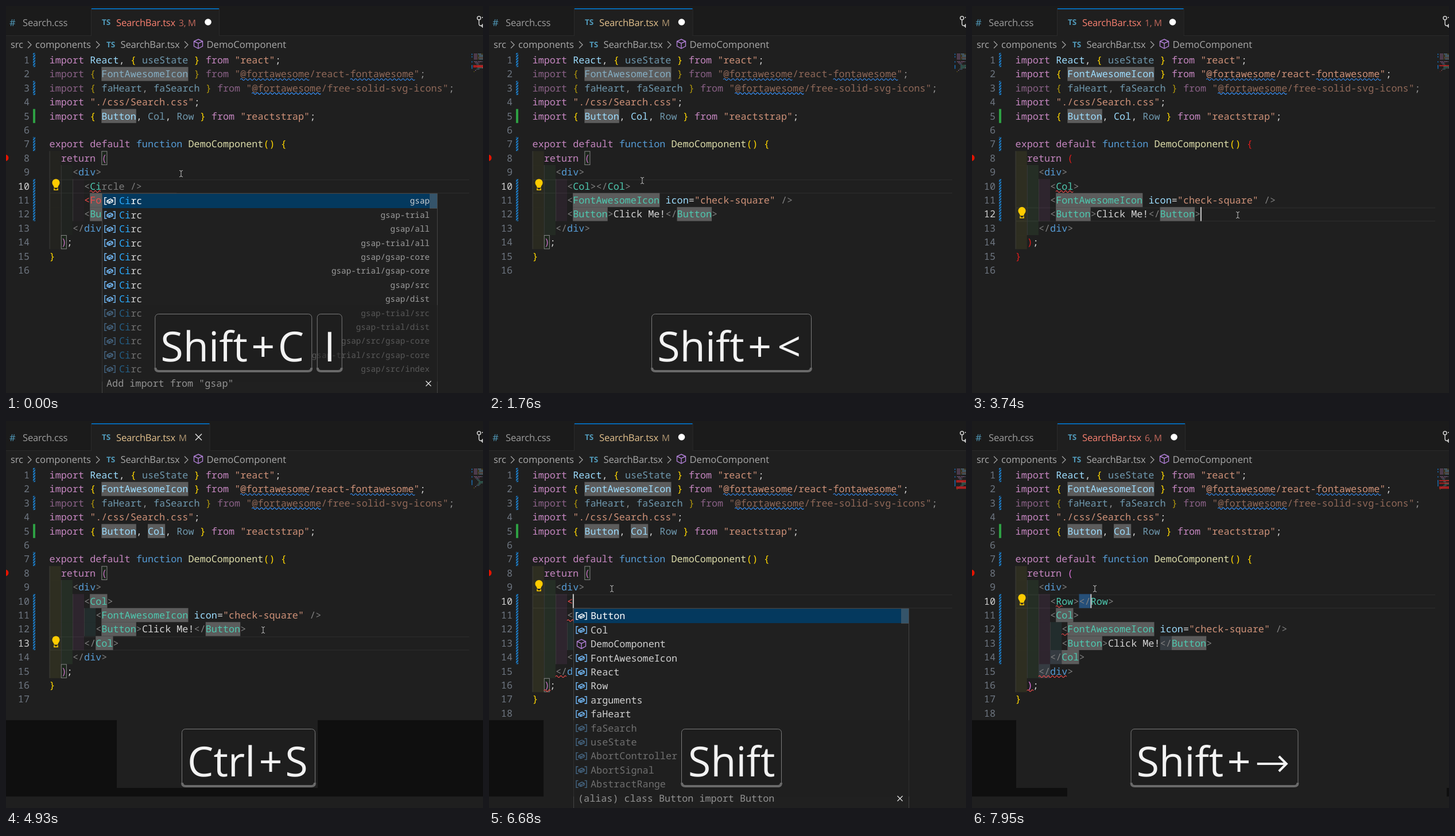
Animation of 831 by 674 pixels, one loop 8 s. Source, as an HTML page:

```html
<!DOCTYPE html>
<html lang="en">
<head>
<meta charset="utf-8">
<title>Editor demo</title>
<style>
html, body { margin: 0; width: 100%; height: 100%; overflow: hidden; background: #1f1f1f; }
svg { display: block; width: 831px; height: 674px; }
text { font: 16.8px 'Noto Sans Mono', 'DejaVu Sans Mono', monospace; white-space: pre; text-rendering: geometricPrecision; }
.ui { font: 16.6px 'Open Sans', 'Noto Sans', sans-serif; }
.tight { letter-spacing: -.22px; }
.icon { font: bold 13.5px 'Open Sans', 'Noto Sans', sans-serif; }
.key { font: 72px 'Open Sans', 'Noto Sans', sans-serif; }
.small { font-size: 14.25px; }
</style>
</head>
<body>
<svg id="stage" viewBox="0 0 831 674"></svg>
<script>
const stage = document.getElementById('stage');
const LOOP = 8000, CHAR = 10.08, LEFT = 75.6, TOP = 81.8, ROW = 24.4;

// Lower-case codes pick a colour; upper-case ones draw it faded.
const INK = {
  k: '#c586c0', v: '#9cdcfe', s: '#ce9178', w: '#d4d4d4', y: '#ffd700', o: '#da70d6',
  g: '#808080', t: '#4ec9b0', b: '#569cd6', f: '#dcdcaa', r: '#f14c4c', h: '#7c7c7c', x: '#dd1c1c'
};
const RAINBOW = ['#ffff40', '#7fff7f', '#ff7fff', '#4fecec'];

const colX = c => LEFT + c * CHAR;
const rowY = n => TOP + (n - 1) * ROW;
const mapY = n => 80.8 + n * 2.2;
const esc = s => s.replace(/&/g, '&amp;').replace(/</g, '&lt;').replace(/>/g, '&gt;');
const rect = (x, y, w, h, fill, more = '') =>
  `<rect x="${x}" y="${y}" width="${w}" height="${h}" fill="${fill}" ${more}/>`;
const text = (x, y, s, fill, more = '') => `<text x="${x}" y="${y}" fill="${fill}" ${more}>${esc(s)}</text>`;
const path = (d, stroke, width = 1.3, more = '') =>
  `<path d="${d}" fill="none" stroke="${stroke}" stroke-width="${width}" ${more}/>`;
const at = (x, y, s) => `<g transform="translate(${x} ${y})">${s}</g>`;

// Document pieces
const DIV = '    g<|bdiv|g>', END = '    g</|bdiv|g>';
const icon = (pad, c = 'g') => `${pad}${c}<|tFontAwesomeIcon|w |vicon|w=|s"check-square"|g />`;
const button = pad => `${pad}g<|tButton|g>|wClick Me!|g</|tButton|g>`;
const P6 = ' '.repeat(6), P8 = ' '.repeat(8);
const OPEN = P6 + 'g<|tCol|g>', CLOSE = P6 + 'g</|tCol|g>';
const flat = line => [DIV, P6 + line, icon(P6), button(P6), END];
const broken = line => [DIV, P6 + line, P6 + 'r<|rFontAwesomeIcon', button(P6), END];
const nested = [OPEN, icon(P8), button(P8), CLOSE];
const wrapped = line => [DIV, P6 + line, ...nested, END];
const typing = line => [DIV, P6 + line, P6 + 'b<|rCol', P8 + 'r<|tFontAwesomeIcon', button(P8), CLOSE, '    v</div'];

const fadeLine = s => s.replace(/(^|\|)(\w)/g, (m, bar, c) => bar + c.toUpperCase());
function documentLines(s) {
  const l2 = 'kimport |y{ |vFontAwesomeIcon|y } |kfrom |s"@fortawesome/react-fontawesome"|w;';
  const l3 = 'kimport |y{ |vfaHeart|w, |vfaSearch|y } |kfrom |s"@fortawesome/free-solid-svg-icons"|w;';
  const [a, b] = s.unclosed ? 'xx' : 'yo';
  return [
    'kimport |vReact|w, |y{ |VuseState|y } |kfrom |s"react"|w;',
    s.unused ? fadeLine(l2) : l2,
    fadeLine(l3),
    'kimport |s"./css/Search.css"|w;',
    `kimport |y{ |vButton|w, |${s.noCol ? 'V' : 'v'}Col|w, |VRow|y } |kfrom |s"reactstrap"|w;`,
    '',
    `kexport |kdefault |bfunction |fDemoComponent|y() |${a}{`,
    `  kreturn |${b}(`,
    ...s.body,
    `  ${b})|w;`, `${a}}`, ''
  ];
}

// Suggestion lists: "label detail"
const each = (label, details) => details.split(' ').map(d => label + ' ' + d);
const CIRC = { x: 167, match: 2, thumb: 27, foot: 'Add import from "gsap"', rows: each('Circ',
  'gsap gsap-trial gsap/all gsap-trial/all gsap/gsap-core gsap-trial/gsap-core gsap/src gsap/dist ' +
  'gsap-trial/src gsap-trial/dist gsap/src/gsap-core gsap-trial/src/gsap-core gsap/src/index') };
const COL = { x: 167, match: 2, thumb: 35, foot: '(alias) class Col import Col', rows: ['Col', 'Collapse reactstrap',
  'Container reactstrap', 'CountQueuingStrategy', 'Comment', 'CompositionEvent', 'ConstantSourceNode', 'ConvolverNode',
  'CookieStore', 'Credential', 'CryptoKey', 'CustomEvent', 'CloseEvent'] };
const ALL = { x: 147, match: 0, thumb: 27, foot: '(alias) class Button import Button', rows: ['Button', 'Col', 'DemoComponent',
  'FontAwesomeIcon', 'React', 'Row', 'arguments', 'faHeart', 'faSearch', 'useState', 'AbortController',
  'AbortSignal', 'AbstractRange'] };
const ROUGH = { x: 167, match: 2, thumb: 35, foot: '(alias) class Row import Row', rows: ['Row', 'RoboMaker aws-sdk',
  'RolesAnywhere aws-sdk', ...each('RoughEase', 'gsap/all gsap-trial/all gsap/EasePack gsap-trial/EasePack ' +
  'gsap/src/EasePack gsap/dist/EasePack gsap-trial/src/EasePack gsap-trial/dist/EasePack gsap/src/all gsap-trial/src/all')] };

const FULL = [[0, 521, 831, 133]];
const HOLED = [[0, 521, 193, 133], [193, 639, 350, 15], [543, 521, 288, 133]];
const TYPO = [[11, 6, 7], [15, 4, 6], [16, 2, 3]];
const TYPO2 = [[10, 7, 9], [12, 8, 9], [15, 4, 9], [16, 2, 3]];
const TYPO3 = [[10, 7, 8], [12, 8, 9], [15, 4, 9], [16, 2, 3]];

// Each entry changes part of the state at its time.
const STEPS = [
  [0, { errors: 3, dirty: 1, unused: 1, noCol: 1, boxed: 1, active: 10, bulb: 10, mouse: [305, 292], shade: [], sel: [],
    tint: .02, squig: [[10, 7, 9]], body: broken('g<|tCi|hrcle />'), list: CIRC, keys: ['Shift+C', 'I'] }],
  [150, { body: broken('g<|tC'), squig: [[10, 7, 8]], keys: ['←'] }],
  [270, { body: broken('g<|tCo|hl></Col>'), squig: [[10, 7, 9]], list: COL, keys: ['O'] }],
  [670, { body: broken('g<|tCol'), keys: ['O', 'L'] }],
  [790, { list: null, squig: [[10, 7, 10]], body: flat('g<|tCol') }],
  [1060, { keys: [], noCol: 0, tint: .05 }],
  [1180, { keys: ['Shift'] }],
  [1330, { body: flat('g<|tCol|g>') }],
  [1640, { body: flat('g<|tCol|g></|tCol|g>'), errors: 0, squig: [], mouse: [267, 304], keys: ['Shift+<'] }],
  [2030, { mouse: [243, 315] }],
  [2180, { unused: 0, mouse: [230, 314] }],
  [2330, { mouse: [188, 314] }],
  [2450, { mouse: [215, 314], sel: [[10, 11, 14]] }],
  [2570, { mouse: [246, 314], sel: [[10, 11, 17]] }],
  [2690, { mouse: [262, 316] }],
  [2840, { keys: ['Ctrl+X'] }],
  [2990, { body: flat('g<|tCol|g>'), sel: [], boxed: 0, tint: .065 }],
  [3110, { errors: 1, unclosed: 1, squig: [[10, 7, 10]] }],
  [3380, { mouse: [380, 346] }],
  [3500, { mouse: [463, 364] }],
  [3620, { active: 12, bulb: 12, caret: [12, 32] }],
  [3740, { keys: [] }],
  [4020, { body: [DIV, OPEN, icon(P6), button(P6), P6, END], active: 13, bulb: 13, caret: [13, 6], keys: ['Enter'] }],
  [4290, { keys: ['Ctrl+V'] }],
  [4410, { body: [DIV, OPEN, icon(P6), button(P6), CLOSE, END], caret: [13, 12], unclosed: 0, boxed: 1, squig: [] }],
  [4660, { errors: 0, keys: ['Ctrl+S'], shade: HOLED, mouse: [448, 364] }],
  [4780, { body: [DIV, ...nested, END], caret: null }],
  [4930, { dirty: 0, hiCol: 1 }],
  [5050, { mouse: [360, 366] }],
  [5200, { mouse: [262, 358] }],
  [5350, { mouse: [232, 322] }],
  [5470, { mouse: [214, 292] }],
  [5620, { active: 9, bulb: 9, caret: [9, 9], keys: [], shade: FULL }],
  [5900, { body: wrapped(''), active: 10, caret: [10, 6], dirty: 1 }],
  [6170, { keys: ['<'], shade: [[0, 521, 95, 133]] }],
  [6290, { body: wrapped('r<'), caret: [10, 7], squig: TYPO }],
  [6680, { list: ALL, keys: ['Shift'] }],
  [6800, { errors: 5, body: typing('g<|tR'), caret: [10, 8], bulb: 10, squig: TYPO2, list: ROUGH, keys: ['Shift+R'],
    shade: FULL, tint: .01 }],
  [7200, { body: typing('g<|tRo|hw>'), caret: [10, 9], keys: ['Shift+R', 'O'] }],
  [7320, { body: typing('g<|tRow'), caret: [10, 10], keys: ['Shift+R', 'O', 'W'] }],
  [7440, { list: null, body: wrapped('g<|tRow'), squig: TYPO3, tint: .065,
    shade: [[0, 521, 77, 133], [77, 639, 89, 15], [827, 639, 4, 15]] }],
  [7560, { errors: 6, body: wrapped('g<|tRow|g></|tRow|g>'), caret: [10, 11], keys: ['Shift+<'] }],
  [7680, { keys: ['Shift'] }],
  [7800, { keys: ['Shift+→'], caret: [10, 12], sel: [[10, 11, 12]] }],
  [7950, { caret: [10, 13], boxed: 0, sel: [[10, 11, 13], [13, 25, 27, 1], [14, 6, 8, 1], [15, 4, 6, 1]] }]
];
let merged = {};
const STATES = STEPS.map(([time, patch]) => ({ time, ...(merged = { ...merged, ...patch }) }));

const chevron = x => path(`M${x - 3} 61.5l6 6-6 6`, '#a0a0a0');
const cube = (x, y, c = '#b180d7') =>
  at(x, y, path('M0-8L7.5-4.5V4L0 8-7.5 4V-4.5ZM-7.5-4.5L0-1 7.5-4.5M0-1V8', c, 1.4));
const cross = (x, y, r, w) => path(`M${x - r} ${y - r}l${2 * r} ${2 * r}m0 ${-2 * r}l${-2 * r} ${2 * r}`, '#e0e0e0', w);

function header(s) {
  const mark = s.errors ? s.errors + ', M' : 'M';
  const dot = !s.errors ? 335.5 : s.errors === 1 ? 349.5 : 352;
  const tone = s.errors ? '#f88070' : '#e2c08d';
  const end = dot + 19;
  return rect(0, 0, 831, 51, '#1b1b1b') + rect(0, 51, 831, 1, '#292929') +
    rect(148, 4, end - 148, 48, '#1f1f1f') + rect(148, 4, 1, 48, '#2b2b2b') + rect(end, 4, 1, 48, '#2b2b2b') +
    rect(149, 4, end - 149, 1.6, '#0078d4') +
    text(6, 34.5, '#', '#519aba', 'class="ui" font-weight="bold" font-style="italic"') +
    text(29, 35, 'Search.css', '#9d9d9d', 'class="ui tight"') +
    text(167, 33, 'TS', '#519aba', 'class="icon"') +
    text(192, 35, 'SearchBar.tsx', tone, 'class="ui tight"') +
    text(301, 34.5, mark, tone, 'class="ui tight" opacity=".75" style="font-size:15.5px"') +
    (s.dirty ? `<circle cx="${dot}" cy="28" r="5.8" fill="#fff"/>` : cross(335.5, 28, 5.5, 1.5)) +
    '<circle cx="824" cy="21" r="3" fill="none" stroke="#d0d0d0" stroke-width="1.5"/>' +
    path('M824 24V31Q824 34.5 828 34.5H831M831 31.5L828 34.5 831 37.5M831 20H829', '#d0d0d0', 1.5) +
    text(8, 73, 'src', '#a9a9a9', 'class="ui tight"') + chevron(41) +
    text(51, 73, 'components', '#a9a9a9', 'class="ui"') + chevron(160) +
    text(175, 71.5, 'TS', '#519aba', 'class="icon"') +
    text(199.5, 73, 'SearchBar.tsx', '#a9a9a9', 'class="ui tight"') + chevron(314) +
    cube(335, 66) + text(349.5, 73, 'DemoComponent', '#a9a9a9', 'class="ui"');
}

function squiggle([line, from, to], color = '#f14c4c') {
  const half = 3.75, n = Math.max(2, Math.round((to - from) * CHAR / half));
  let d = `M${colX(from)} ${rowY(line) + 21.8}`;
  for (let i = 0; i < n; i++) d += `q${half / 2} ${i % 2 ? 3 : -3} ${half} 0`;
  return path(d, color, 1.2);
}

function codeLine(src, n, s) {
  const pad = src.match(/^ */)[0].length, y = rowY(n);
  let out = '', map = '', col = pad, bad = false;
  for (let i = 0; i < pad / 2; i++) {
    out += rect(colX(i * 2), y, CHAR * 2, ROW + .1, RAINBOW[i], `opacity="${s.tint}"`) +
      rect(colX(i * 2), y, 1, ROW, '#3c3c3c');
  }
  for (const seg of src.slice(pad).split('|')) {
    const body = seg.slice(1), word = body.trim(), code = seg.charAt(0);
    if (!body) continue;
    const low = code.toLowerCase(), fade = code !== low ? 'opacity=".64"' : '';
    if (/[tvr]/.test(low) && (/^(FontAwesomeIcon|Button)$/.test(word) || (s.hiCol && word === 'Col')))
      out += rect(colX(col), y, word.length * CHAR, ROW, '#5c5c5c');
    out += text(colX(col), y + 18.2, body, INK[low], fade);
    map += rect(815 + col, mapY(n), word.length, 1.2, INK[low], 'opacity=".5"');
    bad = bad || low === 'r';
    col += body.length;
  }
  if (bad || s.squig.some(q => q[0] === n)) map += rect(814, mapY(n), 17, 2.2, '#d02020', 'opacity=".75"');
  return out + map;
}

function bulb(line) {
  return at(87, rowY(line) + 10, '<path d="M-3.3 5Q-3.3 2.8-5 .8A6.6 6.6 0 1 1 5 .8Q3.3 2.8 3.3 5Z" fill="#ffcc00"/>' +
    path('M-3 6V8.8H3V6', '#ffcc00', 1.6));
}

function editor(s) {
  const lines = documentLines(s), lastEdit = 7 + s.body.length;
  let out = '';
  const y = rowY(s.active);
  out += rect(76, y + .5, 731, 1.6, '#292929') + rect(76, y + ROW - .8, 731, 1.6, '#292929');
  for (const [n, a, b, soft] of s.sel) out += rect(colX(a), rowY(n), (b - a) * CHAR, ROW, soft ? '#353b41' : '#264f78');
  lines.forEach((src, i) => {
    const n = i + 1, cy = rowY(n);
    out += text(41, cy + 18.2, String(n), n === s.active ? '#d0d0d0' : '#6e7681', 'text-anchor="end"') + codeLine(src, n, s);
    if ([1, 3, 7].includes(n) || (n > 9 && n <= lastEdit))
      out += rect(47, cy, 4, ROW, 'url(#hatch)') + rect(811, mapY(n), 1.5, 2.2, '#1b6fb5');
  });
  out += rect(47, rowY(5), 4, ROW, '#2ea043') + '<circle cx="-1" cy="264.5" r="5.5" fill="#e51400"/>';
  if (s.boxed) {
    const frame = (n, c) => rect(colX(c) + .5, rowY(n) + .5, CHAR - 1, ROW - 1, '#006400', 'fill-opacity=".1" stroke="#888"');
    out += frame(8, 9) + frame(9 + s.body.length, 2);
  }
  for (const q of [[2, 33, 45], [2, 52, 63], [3, 35, 47]]) out += squiggle(q, '#3794ff');
  out += s.squig.map(q => squiggle(q)).join('') + bulb(s.bulb);
  if (s.caret) out += rect(colX(s.caret[1]) - .3, rowY(s.caret[0]), 2, ROW, '#c8c8c8');
  return out;
}

function symbol(x, y, color) {
  return at(x, y, path('M-5.5-6H-9V6H-5.5M5.5-6H9V6H5.5M-5-.5L1-3.5 5-1.5V1.5L-1 4.2-5 2.2ZM-5-.5L-1 1.4 5-1.5M-1 1.4V4.2', color, 1.4));
}

function suggestions({ x, match, thumb, foot, rows }) {
  let out = rect(x, 326, 584, 195, '#202020') + rect(x, 327, 584, 25, '#04395e') +
    rect(x + 571, 326, 13, thumb, '#797979', 'opacity=".42"') +
    path(`M${x + .5} 521V326.5H${x + 584.5}V521`, '#454545', 1) +
    path(`M${x + .5} 521V654M${x + 584.5} 521V654`, '#303030', 1) +
    rect(x, 654, 584, 20, '#202020') + path(`M${x + .5} 654V674M${x + 584.5} 654V674`, '#454545', 1);
  rows.forEach((row, i) => {
    const [label, detail = ''] = row.split(' '), y = 339.6 + i * ROW;
    const tint = i ? '#75beff' : '#fff';
    out += `<g opacity="${i < 8 ? 1 : .45}">` +
      (label === 'DemoComponent' ? cube(x + 14, y) : symbol(x + 14, y, tint)) +
      text(x + 30, y + 5.8, label.slice(0, match), '#2aaaff', 'font-weight="bold"') +
      text(x + 30 + match * CHAR, y + 5.8, label.slice(match), i ? '#d0d0d0' : '#fff') +
      text(x + 571, y + 4.8, detail, i ? '#9d9d9d' : '#d0d0d0', 'class="small" text-anchor="end"') + '</g>';
  });
  return out + text(x + 8, 663, foot, '#929292') + cross(x + 569, 657.5, 4.5, 1.3);
}

const KEY_WIDTH = { Shift: 175, 'Shift+<': 279, 'Shift+R': 272, 'Shift+→': 292, 'Ctrl+S': 233, 'Ctrl+X': 236, 'Ctrl+V': 240,
  Enter: 205, I: 44, O: 81, L: 61, W: 94, '←': 79, '<': 78 };
const keyWidth = k => KEY_WIDTH[k] || 274;

function glyph(x, s) {
  const arrow = { '→': 1, '←': -1 }[s];
  if (!arrow) return text(x, 619, s, '#f2f2f2', 'class="key" text-anchor="middle"');
  return `<g transform="translate(${x} 597) scale(${arrow} 1)">${path('M-26 0H25M12-13L25 0 12 13', '#f2f2f2', 4)}</g>`;
}

function keycaps(keys) {
  let x = 422.5 - (keys.reduce((sum, k) => sum + keyWidth(k), 0) + 8.5 * (keys.length - 1)) / 2, out = '';
  for (const k of keys) {
    const w = keyWidth(k), [mod, last] = k.split('+');
    out += rect(x + .5, 536.5, w - 1, 100, '#1f1f1f', 'rx="6" fill-opacity=".5" stroke="#7c7c7c"') +
      path(`M${x + 1} 630q0 6 6 6H${x + w - 7}q6 0 6-6`, '#6a6a6a', 4);
    if (last) {
      const plus = mod === 'Shift' ? 188.5 : 155;
      out += text(x + 10, 619, mod, '#f2f2f2', 'class="key"') + glyph(x + plus, '+') + glyph(x + (plus + 12 + w) / 2, last);
    } else out += glyph(x + w / 2, mod);
    x += w + 8.5;
  }
  return out;
}

const HATCH = '<defs><pattern id="hatch" width="3.4" height="3.4" patternUnits="userSpaceOnUse" patternTransform="rotate(-45)">' +
  '<rect width="3.4" height="2.1" fill="#1b81d0"/></pattern></defs>';

function draw(s) {
  stage.innerHTML = HATCH + rect(0, 0, 831, 674, '#1f1f1f') + header(s) + editor(s) +
    s.shade.map(([x, y, w, h]) => rect(x, y, w, h, '#000', 'opacity=".52"')).join('') +
    (s.list ? suggestions(s.list) : '') + keycaps(s.keys) +
    at(...s.mouse, path('M-3-5.5Q0-5.5 0-3.5V3.5Q0 5.5-3 5.5M3-5.5Q0-5.5 0-3.5M0 3.5Q0 5.5 3 5.5', '#c0c0c0', 1));
}

let start, shown;
function tick(now) {
  start ??= now;
  const t = (now - start) % LOOP;
  const state = STATES.findLast(s => s.time <= t) || STATES[0];
  if (state !== shown) draw(shown = state);
  requestAnimationFrame(tick);
}
draw(shown = STATES[0]);
requestAnimationFrame(tick);
</script>
</body>
</html>
```
